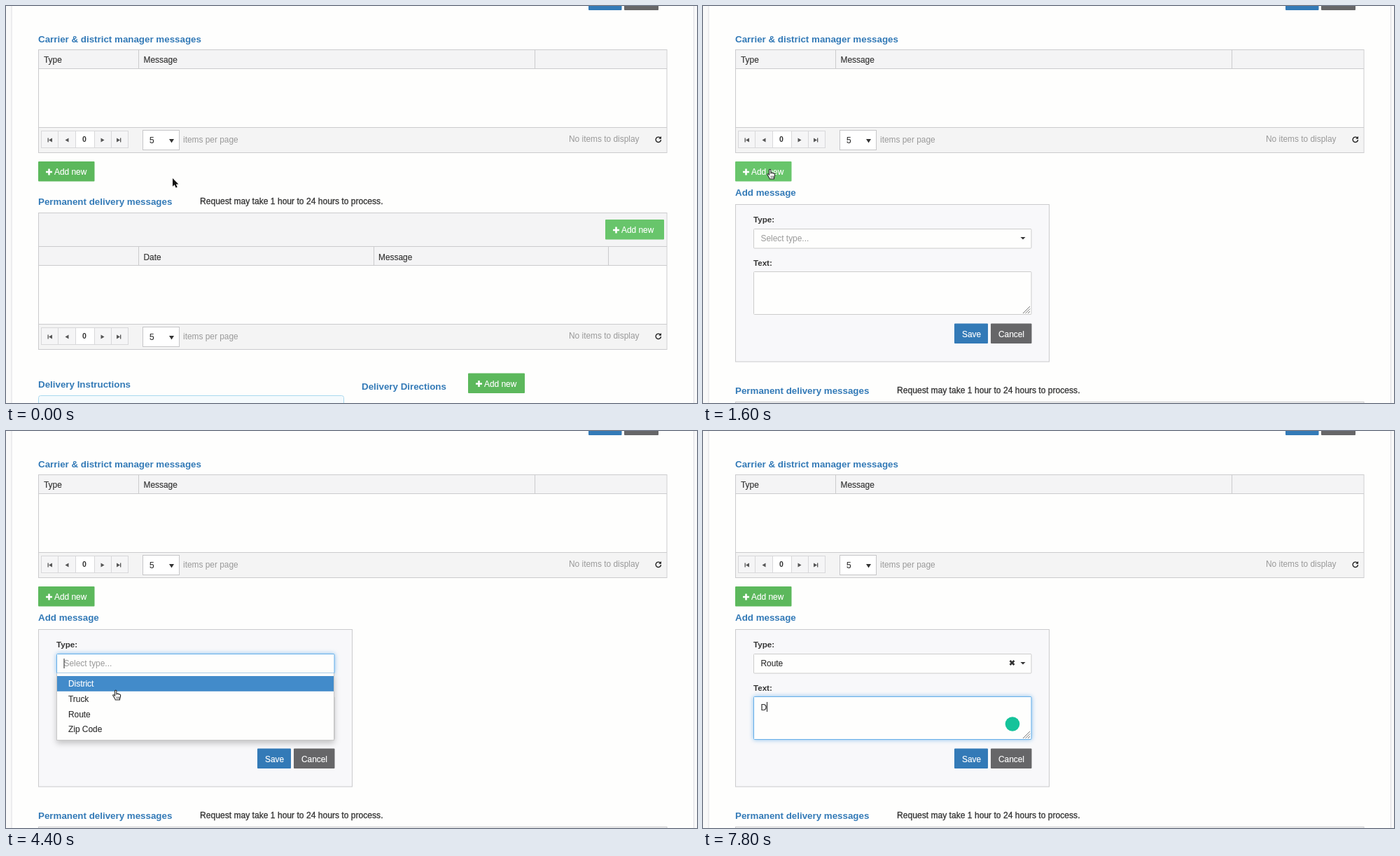
An HTML page that plays this animation: 987x567 px, repeating every 8 s.

```html
<!DOCTYPE html>
<html lang="en">
<head>
<meta charset="utf-8">
<title>Add message form</title>
<style>
html, body { margin: 0; width: 100%; height: 100%; overflow: hidden; background: #fefefd; }
svg { display: block; }
text { font: 11.9px "Liberation Sans", Arial, sans-serif; fill: #333; stroke: #333; stroke-width: .15px; white-space: pre; }
text.title { font-weight: bold; font-size: 13.35px; fill: #337ab7; stroke: none; }
text.bold { font-weight: bold; font-size: 11.6px; stroke: none; }
text.zero { font-weight: bold; font-size: 10.5px; stroke: none; }
text.dim { fill: #999; stroke: none; }
text.light { fill: #fff; stroke: #fff; }
text.note { font-size: 12.1px; stroke-width: .3px; }
.focus { filter: drop-shadow(0 0 3px rgba(102,175,233,.8)); }
.menu { filter: drop-shadow(0 4px 4px rgba(0,0,0,.22)); }
</style>
</head>
<body>
<svg id="stage" width="987" height="567"></svg>
<script>
const LOOP = 8000, STEP = 200;
const LINE = '#cbcbcd', GREEN = '#5cb85c', HOVER = '#68c56b', BLUE = '#337ab7', GRAY = '#666668';
const stage = document.getElementById('stage');

const text = (x, y, s, cls = '') => `<text x="${x}" y="${y}" class="${cls}">${s}</text>`;
const fill = (x, y, w, h, color, more = '') =>
  `<rect x="${x}" y="${y}" width="${w}" height="${h}" fill="${color}" ${more}/>`;
const box = (x, y, w, h, color, stroke = LINE, more = '') =>
  fill(x + .5, y + .5, w - 1, h - 1, color, `stroke="${stroke}" ${more}`);
const path = (d, more = '') => `<path d="${d}" ${more}/>`;
const shift = (x, y, s) => `<g transform="translate(${x} ${y})">${s}</g>`;
const vline = (x, y, h) => fill(x, y, 1, h, LINE);
const hline = y => fill(46, y, 898, 1, LINE);

function addButton(x, y, w, color) {
  return fill(x, y, w, 28.5, color, 'rx="1"') +
    path(`M${x + 11} ${y + 15}h9m-4.5 -4.5v9`, 'stroke="#fff" stroke-width="2.6"') +
    text(x + 23, y + 19.2, 'Add new', 'light');
}

function pager(y) {
  const edges = [50, 74, 99, 126, 150, 175];
  let s = fill(47, y + 1, 896, 35, '#f4f4f4') + hline(y);
  for (let i = 0; i < 5; i++)
    s += box(edges[i], y + 5, edges[i + 1] - edges[i] + (i < 4), 25, i == 2 ? '#fff' : '#f5f5f6', '#d8d8da');
  const left = 'l5 -3v6z', right = 'l-5 -3v6z', mid = y + 18.5;
  s += path(`M61 ${mid}${left}M59.5 ${mid - 3}h1.3v6h-1.3zM84.5 ${mid}${left}` +
    `M140.5 ${mid}${right}M163 ${mid}${right}M163 ${mid - 3}h1.3v6h-1.3z`, 'fill="#555"');
  s += text(109, y + 21, '0', 'zero') + box(195, y + 4, 53, 29, '#fff', '#c6c6c8') +
    text(205, y + 22.5, '5') + path(`M233 ${y + 17}h7l-3.5 5.5z`, 'fill="#333"') +
    text(253, y + 21.5, 'items per page', 'dim') + text(804, y + 21, 'No items to display', 'dim');
  return s + path(`M934.5 ${y + 15.3}a3.7 3.7 0 1 0 1 2.8`, 'fill="none" stroke="#222" stroke-width="1.4"') +
    path(`M932.2 ${y + 16.8}h3.8v-3.8z`, 'fill="#222"');
}

function messageGrid() {
  return text(46, 51.5, 'Carrier &amp; district manager messages', 'title') +
    box(46, 62, 898.5, 148, '#fefefd') + fill(47, 63, 896, 26, '#f4f4f5') + hline(89) +
    vline(189, 63, 26) + vline(755, 63, 26) +
    text(54, 81, 'Type') + text(196.5, 81, 'Message') + pager(173);
}

function lowerPage() {
  return text(46, 284, 'Permanent delivery messages', 'title') +
    text(277, 282.5, 'Request may take 1 hour to 24 hours to process.', 'note') +
    box(46, 295, 898.5, 196, '#fefefd') + fill(47, 296, 896, 74, '#f4f4f5') +
    hline(343) + hline(370) + addButton(856, 305, 84, HOVER) +
    [189, 525, 860].map(x => vline(x, 344, 26)).join('') +
    text(196.5, 362.5, 'Date') + text(532, 362.5, 'Message') + pager(454) +
    text(46, 545, 'Delivery Instructions', 'title') +
    text(508, 547.5, 'Delivery Directions', 'title') + addButton(660, 524.5, 81, GREEN) +
    box(46, 556, 437, 40, '#f4fafd', '#a9d9ee', 'rx="3"');
}

function typeField(t, open, chosen) {
  const focus = t >= 2800 && t < 6200, hover = t >= 2400 && t < 2800;
  let s = box(72, 318, 397.5, 28.5, hover ? '#e6e6e6' : '#fefefd',
    focus ? '#66afe9' : hover ? '#adadad' : '#ccc', `rx="1" ${focus ? 'class="focus"' : ''}`);
  s += chosen ? text(82.5, 336, 'Route') : text(82.5, 336, 'Select type...', 'dim');
  if (chosen) s += path('M438.5 328l6 6m0 -6l-6 6', 'stroke="#333" stroke-width="2.6"');
  if (!open) s += path('M453.5 330h7l-3.5 3.6z', 'fill="#333"');
  else if (t < 3400 || t >= 3800) s += fill(82.5, 325, 1, 14, '#222');
  return s;
}

function textField(t) {
  const focus = t >= 6200, typed = t >= 7000;
  let s = box(72, 379, 397.5, 62, '#fefefd', focus ? '#66afe9' : '#ccc', `rx="1" ${focus ? 'class="focus"' : ''}`) +
    path('M457 439l10 -10M460.5 439l6.5 -6.5M464 439l3 -3', 'stroke="#777"');
  if (typed) s += text(82.5, 398.5, 'D');
  if (focus && (t < 6600 || typed && t < 7400 || t >= 7800))
    s += fill(typed ? 91 : 82.5, 387, 1, 14, '#222');
  if (t >= 6400) s += '<circle cx="442" cy="418.5" r="10.3" fill="#15c39a"/>';
  else if (t >= 2000) s += '<circle cx="449" cy="426" r="3.7" fill="#15c39a"/>';
  return s;
}

function menu(active) {
  return box(72, 346, 397, 96, '#fefefd', '#c8c8c8', 'class="menu"') + fill(73, 346, 395, 3, '#fefefd') +
    fill(73, 350 + active * 21.8, 395, 21.8, '#428bca') +
    ['District', 'Truck', 'Route', 'Zip Code'].map((s, i) =>
      text(89, 365 + i * 21.8, s, i == active ? 'light' : '')).join('');
}

function form(t, grow, pos) {
  const open = t >= 2800 && t < 5200;
  const top = 251 + 32 * grow, height = 1 + 224.5 * grow;
  const row = Math.max(0, Math.min(3, Math.floor((pos.y - 349.5) / 21.8)));
  const inside = text(72, 309, 'Type:', 'bold') + text(72, 371, 'Text:', 'bold') + textField(t) +
    typeField(t, open, t >= 5200) +
    fill(359, 453.5, 48, 28.5, BLUE, 'rx="1"') + text(370, 472.7, 'Save', 'light') +
    fill(411, 453.5, 58.5, 28.5, GRAY, 'rx="1"') + text(422, 472.7, 'Cancel', 'light') +
    (open ? menu(row) : '');
  return (grow == 1 ? text(46, 271.3, 'Add message', 'title') : '') +
    fill(46, top, 449, height, LINE) +
    (height > 2 ? fill(47, top + 1, 447, height - 2, '#f8f8fa') : '') +
    `<svg x="46" y="${top}" width="449" height="${height - 1}" viewBox="46 283 449 ${height - 1}">${inside}</svg>`;
}

const ease = p => (1 - Math.cos(Math.PI * Math.max(0, Math.min(1, p)))) / 2;

// Pointer stops: time, x, y
const stops = [[0, 238, 246], [200, 238, 246], [1000, 91, 233], [1600, 91, 233], [2600, 165, 331],
  [3600, 165, 331], [4400, 152, 370], [5000, 148, 396], [LOOP, 148, 396]];

function pointerAt(t) {
  const i = stops.findIndex(s => s[0] > t);
  const [t0, x0, y0] = stops[i - 1], [t1, x1, y1] = stops[i];
  const k = ease((t - t0) / (t1 - t0));
  return { x: x0 + (x1 - x0) * k, y: y0 + (y1 - y0) * k };
}

function pointer(t, { x, y }) {
  if (t >= 7000) return '';
  if (t >= 5200) {
    const d = 'M-3 -6.5q3 0 3 2v9q0 2 -3 2M3 -6.5q-3 0 -3 2v9q0 2 3 2M-1.5 1h3';
    return shift(x, y, path(d, 'fill="none" stroke="#fff" stroke-width="2.6"') +
      path(d, 'fill="none" stroke="#222" stroke-width="1.2"'));
  }
  const hand = t >= 800 && t < 2000 || t >= 2400;
  return shift(x, y, hand
    ? path('M3.5 8V1.8q0 -1.6 1.2 -1.6t1.2 1.6V5.6q.8 -1 2 0 1 -.6 1.8 .5 1.9 -.3 1.9 1.6c0 3 -1.2 3.8 -1.2 6.3H4.2' +
      'C3.8 11.6 1.8 10 .8 7.8c-.5 -1.2 1.2 -1.8 2.7 .2z', 'fill="#fff" stroke="#222" stroke-width="1.1"') +
      path('M6.2 9.5v3M8.1 9.5v3M9.8 9.5v3', 'stroke="#222" stroke-width=".7"')
    : path('M0 0v11.8l2.7 -2.5 1.9 4.3 2.1 -.9 -1.9 -4.2h3.6z', 'fill="#111" stroke="#fff" stroke-width="1" paint-order="stroke"'));
}

function draw(t) {
  const grow = ease((t - 1190) / 400), shown = t >= 1200;
  const pos = pointerAt(t);
  const drop = shown ? 14 + 256 * grow : 0;
  stage.innerHTML = fill(0, 0, 987, 567, '#fefefd') +
    fill(0, 0, 7, 567, '#f9f9f9') + fill(983, 0, 4, 567, '#f9f9f9') +
    fill(7.5, 0, 1, 567, '#dcdce0') + fill(982, 0, 1, 567, '#dcdce0') +
    fill(832, -5, 47.5, 11, BLUE, 'rx="1"') + fill(883, -5, 49, 11, GRAY, 'rx="1"') +
    messageGrid() + addButton(46, 222, 80.5, t >= 800 && t < 2000 ? HOVER : GREEN) +
    shift(0, Math.round(drop), lowerPage()) +
    (shown ? form(t, grow, pos) : '') + pointer(t, pos);
}

// The screen refreshes five times a second
let last = -1;
function tick() {
  const t = Math.floor(performance.now() % LOOP / STEP) * STEP;
  if (t != last) draw(last = t);
  requestAnimationFrame(tick);
}
tick();
</script>
</body>
</html>
```
